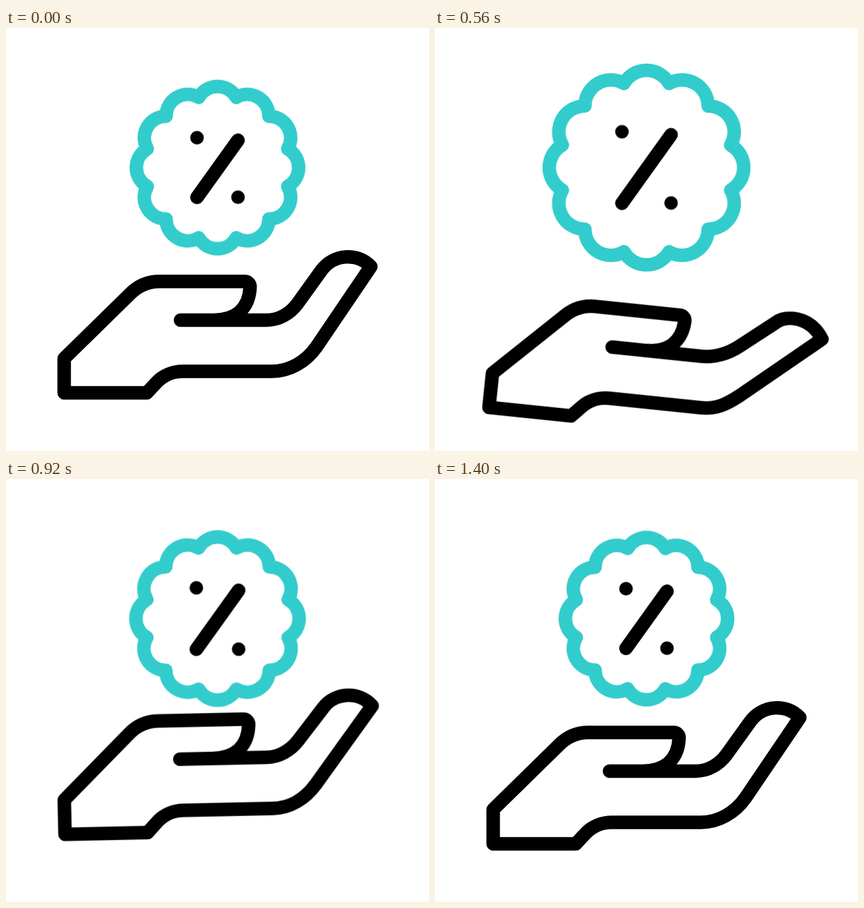
These frames come from a looping animation (640 by 640 pixels, 1.44 s). An HTML page:

```html
<!DOCTYPE html>
<html lang="en">
<head>
<meta charset="utf-8">
<title>Discount in hand</title>
<style>
  html, body { margin: 0; width: 100%; height: 100%; overflow: hidden; background: #fff; }
  svg { display: block; width: 100vw; height: 100vh; }

  path {
    fill: none;
    stroke: #000;
    stroke-width: 20.5;
    stroke-linecap: round;
    stroke-linejoin: round;
    vector-effect: non-scaling-stroke;
  }
  #badge { stroke: #33cccc; }

  .pulse, .lift, .tilt, #hand {
    animation: 1440ms cubic-bezier(.61, 0, .39, 1) infinite both;
  }
  .pulse { animation-name: pulse; }
  .late { animation-delay: 80ms; }
  .lift { animation-name: lift; }
  .tilt { animation-name: tilt; transform-origin: 88px 490px; }
  #hand { animation-name: bend; }

  @keyframes pulse {
    0%, 69.444%, 100% { transform: scale(1); }
    36.111% { transform: scale(1.2); }
  }
  @keyframes lift {
    0%, 94.444%, 100% { transform: translateY(0); }
    33.333% { transform: translateY(24.5px); }
    59.722% { transform: translateY(-14.6px); }
  }
  @keyframes tilt {
    0%, 97.222%, 100% { transform: rotate(0deg); }
    33.333% { transform: rotate(6.1deg); }
    69.444% {
      transform: rotate(-1.4deg);
      animation-timing-function: cubic-bezier(.333, 0, .667, 1);
    }
  }
  @keyframes bend {
    0%, 79.861%, 100% {
      d: path("M264 442 L394 442 C413 442 430 432 441 417 L477 367 C495 342 532 339 552 361 L470 482 C454 505 429 519.5 402 519.5 L268 519.5 C253 519.5 238 525.5 228 536 L213 552 L88 552 L88 500 L188 402 C199.5 390.5 215 383.5 232 383.5 L361 383.5 C366 383.5 369.5 387 369.3 392 C368 422 350 442 314 442");
    }
    33.333% {
      d: path("M264 442 L400.5 442 C420 442 440 433.5 455 421.5 L508.5 378.6 C521 367.4 558 365 579 398 L463.5 495.4 C444 511 430 519.5 407.5 519.5 L268 519.5 C253 519.5 238 525.5 228 536 L213 552 L88 552 L88 500 L188 402 C199.5 390.5 215 383.5 232 383.5 L361 383.5 C366 383.5 369.5 387 369.3 392 C368 422 350 442 314 442");
    }
  }
</style>
</head>
<body>
<svg viewBox="0 0 640 640">
  <g transform="translate(320 211.2)">
    <g class="pulse"><path id="badge"/></g>
    <g class="pulse late">
      <path d="M31 -41.5 L-31 45 M-31 -45.2 h.01 M31 44.7 h.01"/>
    </g>
  </g>
  <g class="lift"><g class="tilt"><path id="hand"/></g></g>
</svg>
<script>
  // Scalloped rim: twelve equal arcs meeting on an inner circle.
  const lobes = 12, inner = 110, bulge = 32.8;
  const cusp = i => {
    const a = (i - 0.5) * 2 * Math.PI / lobes;
    return `${(inner * Math.sin(a)).toFixed(2)} ${(-inner * Math.cos(a)).toFixed(2)}`;
  };
  let rim = `M${cusp(0)}`;
  for (let i = 1; i <= lobes; i++) rim += `A${bulge} ${bulge} 0 0 1 ${cusp(i)}`;
  document.getElementById('badge').setAttribute('d', rim + 'Z');
</script>
</body>
</html>
```
